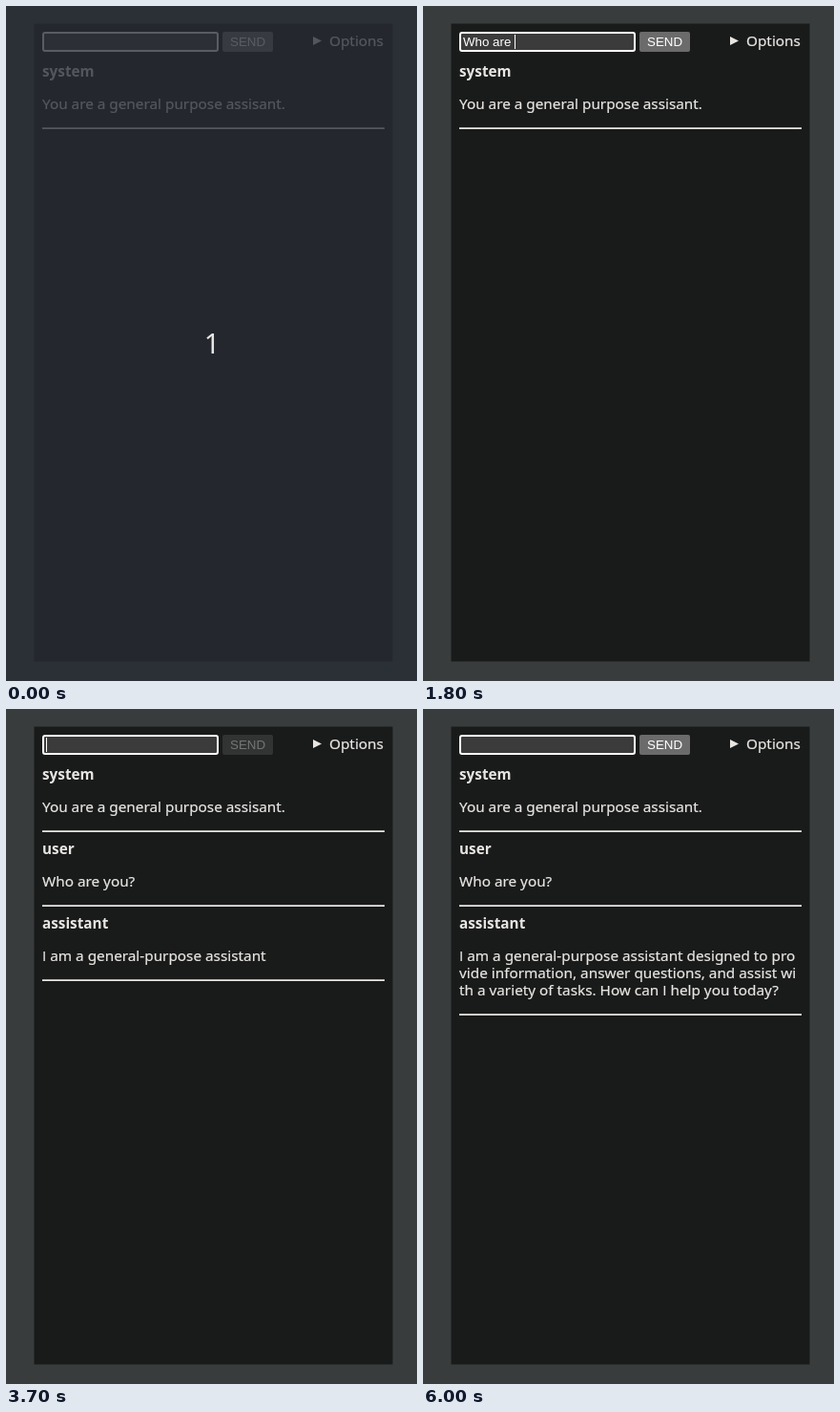
Animation of 431x707 px, one loop 6200 ms. Source, as an HTML page:

```html
<!DOCTYPE html>
<html lang="en">
<head>
<meta charset="utf-8">
<title>Chat demo</title>
<style>
  html, body { margin: 0; width: 100%; height: 100%; overflow: hidden; background: #393c3d; }
  svg { display: block; width: 431px; height: 707px; }
  text { font: 15.3px "Noto Sans", "Open Sans", sans-serif; fill: #e8e6e3; white-space: pre; }
  .body { stroke: #e8e6e3; stroke-width: .2px; }
  .role { font-weight: 700; }
  .plain { font-family: "Open Sans", sans-serif; }
  .ui { font: 13.333px "Liberation Sans", Arial, sans-serif; fill: #fff; }
  .count { font-size: 29px; }
</style>
</head>
<body>
<svg viewBox="0 0 431 707">
  <rect width="431" height="707" fill="#393c3d"/>
  <rect x="29.5" y="18.5" width="376" height="668" fill="#191b1a"/>
  <rect x="39" y="28" width="183" height="19" rx="2" fill="#3b3b3b" stroke="#fff" stroke-width="2"/>
  <text id="typed" class="ui" x="42" y="42"></text>
  <rect id="caret" y="30" width="1" height="15" fill="#fff"/>
  <rect id="button" x="227" y="27" width="53" height="21" rx="2"/>
  <text id="send" class="ui" x="235" y="42">SEND</text>
  <path d="M322 32L331 36.5L322 41Z" fill="#e8e6e3"/>
  <text class="body" x="339" y="42">Options</text>
  <g id="log"></g>
  <g id="intro">
    <rect width="431" height="707" fill="#272b34" fill-opacity=".77"/>
    <text class="count" x="207.7" y="364">1</text>
  </g>
</svg>
<script>
const LOOP = 6200;
const PROMPT = 'Who are you?';
const REPLY = [
  'I am a general-purpose assistant designed to pro',
  'vide information, answer questions, and assist wi',
  'th a variety of tasks. How can I help you today?'
];

// [start ms, value]; the last entry reached applies
const TYPED = [[0, 0], [400, 1], [1100, 2], [1200, 3], [1400, 4], [1500, 5], [1600, 6],
  [1700, 7], [1800, 8], [2100, 9], [2200, 10], [2300, 11], [2500, 12], [3000, 0]];
const CARET = [[0, 0], [100, 1], [900, 0], [1100, 1], [3100, 0], [3500, 1],
  [4000, 0], [4500, 1], [5000, 0], [5500, 1], [6000, 0]];
const STREAM = [[0, ''], [3500, 'I am'], [3600, 'general-purpose'], [3700, 'assistant'],
  [3800, 'information'], [3900, 'and assist'], [4000, 'tasks'], [4200, 'can I'], [4300, 'today?']];
const BUSY = [[0, 0], [3000, 1], [4300, 0]];

const $ = id => document.getElementById(id);
const at = (steps, t) => steps.filter(s => s[0] <= t).pop()[1];

const fullReply = REPLY.join('');
const replyLength = word => word ? fullReply.indexOf(word) + word.length : 0;

function wrap(length) {
  const lines = [];
  for (const line of REPLY) {
    if (length <= 0) break;
    lines.push(line.slice(0, length));
    length -= line.length;
  }
  return lines;
}

// The capital I is drawn without serifs
const label = (s, y, cls = 'body') => `<text class="${cls}" x="38" y="${y}">` +
  s.replace(/I/g, '<tspan class="plain">I</tspan>') + '</text>';

const row = (y, fill) => `<rect x="38" y="${y}" width="359" height="1" fill="${fill}"/>`;

function message(role, lines, top) {
  const body = lines.map((s, i) => label(s, top + 49 + i * 18)).join('');
  const ruleY = top + 68 + (lines.length - 1) * 18;
  return label(role, top + 15, 'role') + body + row(ruleY, '#b8b7b4') + row(ruleY + 1, '#e8e6e3');
}

let shown = '';
function draw(t) {
  const typed = $('typed');
  typed.textContent = PROMPT.slice(0, at(TYPED, t));
  const width = typed.textContent ? typed.getComputedTextLength() : 0;
  $('caret').setAttribute('x', Math.floor(42 + width));
  $('caret').style.opacity = at(CARET, t);

  const busy = at(BUSY, t);
  $('button').style.fill = busy ? '#323333' : '#6b6b6b';
  $('send').style.fill = busy ? '#757575' : '#fff';
  $('intro').style.display = t < 100 ? '' : 'none';

  const reply = wrap(replyLength(at(STREAM, t)));
  let log = message('system', ['You are a general purpose assisant.'], 59);
  if (t >= 3000) log += message('user', [PROMPT], 137);
  if (reply.length) log += message('assistant', reply, 215);
  if (log !== shown) $('log').innerHTML = shown = log;
}

const start = performance.now();
function tick() {
  draw((performance.now() - start) % LOOP);
  requestAnimationFrame(tick);
}
tick();
</script>
</body>
</html>
```
